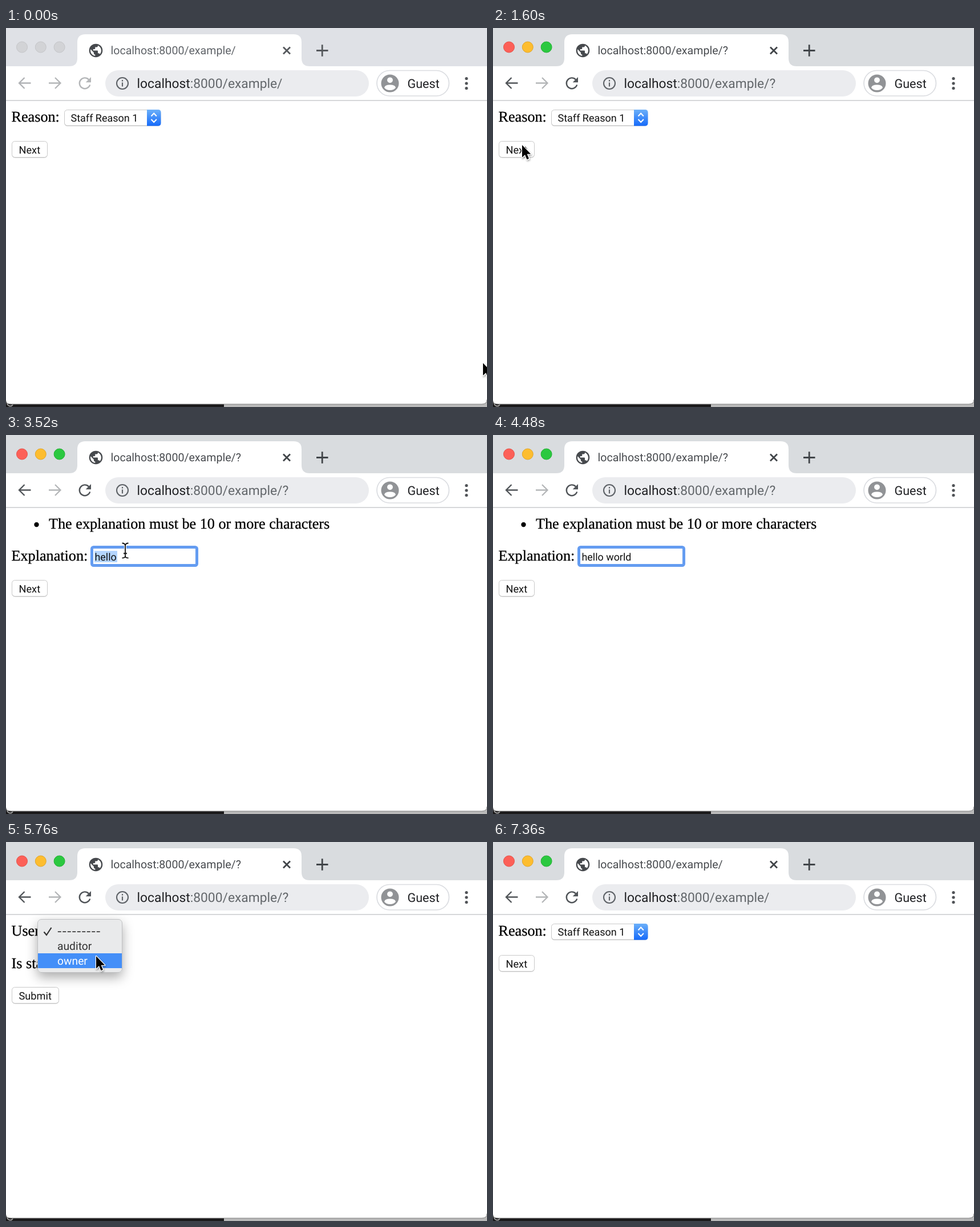
Recreate the animation shown at these times as an HTML page. Size 843x664 px, loop 7.52 s.

```html
<!DOCTYPE html>
<html lang="en">
<head>
<meta charset="utf-8">
<title>Form wizard</title>
<style>
  html, body { margin: 0; width: 100%; height: 100%; overflow: hidden; background: #fff; }
  svg { display: block; width: 843px; height: 664px; }
  text { white-space: pre; text-rendering: geometricPrecision; }
  .ui { font-family: Roboto, "Open Sans", sans-serif; }
  .serif { font: 26.2px "Liberation Serif", "Noto Serif", serif; stroke: #000; stroke-width: .3; }
  .line { fill: none; stroke-linecap: butt; }
</style>
</head>
<body>
<svg viewBox="0 0 843 664">
  <defs>
    <linearGradient id="blue" x1="0" y1="0" x2="0" y2="1">
      <stop offset="0" stop-color="#6cb0f9"/><stop offset="1" stop-color="#156afa"/>
    </linearGradient>
    <filter id="lift" x="-40%" y="-50%" width="180%" height="220%">
      <feDropShadow dx="0" dy="8" stdDeviation="10" flood-opacity=".33"/>
    </filter>
    <filter id="soft" x="-50%" y="-50%" width="220%" height="220%">
      <feDropShadow dx="1" dy="2" stdDeviation="1.6" flood-opacity=".35"/>
    </filter>
    <path id="bar" d="M-5.500 -13.500Q0 -13.500 0 -9V9Q0 12.500 -5.500 12.500M5.500 -13.500Q0 -13.500 0 -9V9Q0 12.500 5.500 12.500M-3 4.500H3"/>
  </defs>

  <!-- desktop strip and window body -->
  <rect y="640" width="382" height="24" fill="#1b1a1b"/>
  <rect x="382" y="640" width="461" height="24" fill="#b9b9b9"/>
  <path d="M2 657a5.5 5.5 0 0 0 10 3" class="line" stroke="#aaa" stroke-width="1.6"/>
  <path d="M0 0H843V651Q843 659 834 659H9Q0 659 0 653Z" fill="#fff"/>
  <path d="M843 651Q843 659 834 659H9Q0 659 0 653" class="line" stroke="#808080"/>

  <!-- tab strip -->
  <rect id="strip" width="843" height="67"/>
  <path d="M111 67Q125 67 125 53V25Q125 11 139 11H504Q518 11 518 25V53Q518 67 532 67Z" fill="#fff"/>
  <g id="lights"></g>
  <path transform="translate(143.3 25.3) scale(1.18)" fill="#46494d" d="M12 2a10 10 0 1 0 0 20a10 10 0 0 0 0 -20zm-1 17.930c-3.950-.490-7-3.850-7-7.930 0-.620.080-1.210.210-1.790L9 15v1c0 1.100.900 2 2 2zm6.900-2.540c-.260-.810-1-1.390-1.900-1.390h-1v-3c0-.550-.450-1-1-1H8v-2h2c.550 0 1-.450 1-1V7h2c1.100 0 2-.900 2-2v-.410c2.930 1.190 5 4.060 5 7.410 0 2.080-.800 3.970-2.100 5.390z"/>
  <text id="title" class="ui" x="183.500" y="46" font-size="19.6"></text>
  <path id="tabIcons" d="M486 33.500L498 45.500M498 33.500L486 45.500M544 39.500H564.500M554.200 29.300V49.700" class="line" stroke-width="2.800"/>

  <!-- toolbar -->
  <path d="M0 127H843" stroke="#d6d7d9" stroke-width="1.8"/>
  <path id="back" d="M43.500 96.500H23M32.500 87L23 96.500L32.500 106" class="line" stroke-width="2.3"/>
  <path d="M75 96.500H95.500M86 87L95.500 96.500L86 106" class="line" stroke="#b4b6b8" stroke-width="2.3"/>
  <g id="reload">
    <path d="M145 90.300A9.400 9.400 0 1 0 147.200 99.500" class="line" stroke="currentColor" stroke-width="2.4"/>
    <path d="M149 86V95.300H139.700Z" fill="currentColor"/>
  </g>
  <rect x="174" y="74" width="462" height="46" rx="23" fill="#ebecef"/>
  <g stroke="#5f6368" stroke-width="2.1" fill="none">
    <circle cx="204" cy="97" r="10"/>
    <path d="M204 95.500V102.500M204 91V93.500"/>
  </g>
  <text class="ui" x="229.500" y="104.800" font-size="22.8" fill="#202124">localhost<tspan id="url" fill="#63676b"></tspan></text>
  <rect x="650" y="74.500" width="126.500" height="44.500" rx="22.200" fill="#fff" stroke="#dadce0" stroke-width="1.700"/>
  <circle cx="673" cy="97" r="15.500" fill="#919396"/>
  <circle cx="673" cy="91.300" r="4.900" fill="#fff"/>
  <path d="M663 104.500Q664 99.500 673 99.500T683 104.500Q679.500 109 673 109T663 104.500Z" fill="#fff"/>
  <text class="ui" x="703.500" y="104.800" font-size="21.6" fill="#202124">Guest</text>
  <g fill="#505357">
    <circle cx="807" cy="88.500" r="2.600"/><circle cx="807" cy="97" r="2.600"/><circle cx="807" cy="105.500" r="2.600"/>
  </g>

  <g id="page"></g>
  <g id="arrow" filter="url(#soft)">
    <path d="M0 0V21.800L5 17L8.500 25.300L12 23.800L8.600 15.800H15.200Z" stroke="#fff" stroke-width="2.400" stroke-linejoin="round" paint-order="stroke"/>
  </g>
  <g id="beam" class="line">
    <use href="#bar" stroke="#fff" stroke-width="4"/>
    <use href="#bar" stroke="#111" stroke-width="1.800"/>
  </g>
</svg>
<script>
const STEP = 160, STEPS = 47;
const $ = id => document.getElementById(id);

// Pointer keys: step, x, y, shape (empty shape hides it)
const pointer = [
  [0, 836, 587, 'arrow'], [1, 836, 587, 'arrow'], [5, 224, 175, 'arrow'],
  [6, 205, 160, 'arrow'], [8, 51, 205, 'arrow'], [11, 51, 205, 'arrow'],
  [13, 205, 157, 'beam'], [14, 205, 157, ''], [20, 235, 212, 'beam'],
  [22, 209, 203, 'beam'], [23, 209, 203, ''], [31, 178, 160, 'arrow'],
  [32, 156, 139, 'arrow'], [34, 156, 152, 'arrow'], [36, 158, 200, 'arrow'],
  [37, 158, 200, 'arrow'], [38, 108, 209, 'arrow'], [39, 108, 209, 'arrow'],
  [40, 52, 264, 'arrow'], [41, 52, 264, 'arrow'], [44, 720, 610, 'arrow'],
  [45, 720, 610, '']
];

const text = (x, y, str, size = 18, fill = '#111') =>
  `<text class="ui" x="${x}" y="${y}" font-size="${size}" fill="${fill}">${str}</text>`;
const dashes = (x, y) =>
  `<text x="${x}" y="${y}" font-size="18.5" fill="#222" style="font-family:Inter,sans-serif">---------</text>`;
const label = (x, y, str) => `<text class="serif" x="${x}" y="${y}">${str}</text>`;

const box = (x, y, w, h, r = 5) =>
  `<rect x="${x}" y="${y + 1}" width="${w}" height="${h}" rx="${r}" fill="#bdbdbd"/>
   <rect x="${x}" y="${y}" width="${w}" height="${h}" rx="${r}" fill="#fff" stroke="#c9c9c9"/>`;

const button = (y, w, str) => box(10.5, y, w, 28) + text(22.5, y + 21.2, str, 18.2);

const select = (x, w, content) => {
  const r = x + w;
  return box(x, 143.5, w, 27.5) + content +
    `<path d="M${r - 24} 143H${r - 4.5}Q${r + .5} 143 ${r + .5} 148V166.500Q${r + .5} 171.500 ${r - 4.5} 171.500H${r - 24}Z" fill="url(#blue)"/>
     <path d="M${r - 16.5} 154.500l4.700 -5l4.700 5m-9.400 5.500l4.700 5l4.700 -5" class="line" stroke="#fff" stroke-width="2"/>`;
};

const reasonPage = () =>
  label(9.5, 164, 'Reason:') + select(102.5, 168.5, text(113.5, 164, 'Staff Reason 1')) + button(198.5, 62, 'Next');

function explainPage(n) {
  const failed = n >= 19, dy = failed ? 56 : 0;
  const typed = n < 23 ? 'hello'.slice(0, Math.max(0, n - 13))
                       : 'hello world'.slice(0, (n - 22) * 2);
  const focused = n >= 13 && n < 19 || n >= 21;
  const error = '<circle cx="53.500" cy="157" r="4.200"/>' +
    label(75, 164, 'The explanation must be 10 or more characters');
  const ring = focused
    ? `<rect x="150.500" y="${140.5 + dy}" width="184" height="32" rx="3" fill="#fff" stroke="#649cf1" stroke-width="5"/>`
    : `<rect x="152.500" y="${142.5 + dy}" width="180" height="28" fill="#fff" stroke="#a9a9a9" stroke-width="1.600"/>`;
  const mark = n === 22 ? `<rect x="155" y="${147 + dy}" width="40" height="20" fill="#b4d5fe"/>` : '';
  return (failed ? error : '') + label(9.5, 164 + dy, 'Explanation:') + ring + mark +
    text(155.5, 163.5 + dy, typed, 17.9) + button(198.5 + dy, 62, 'Next');
}

function menu(n) {
  const row = n - 34;
  const ink = i => i === row ? '#fff' : '#333';
  return `<rect x="55.500" y="135.500" width="148" height="93" rx="6.500" fill="#e9eaeb" stroke="#bfc0c2" filter="url(#lift)"/>
    <rect x="56" y="${143 + 26 * row}" width="147" height="26" fill="#448ff8"/>
    <path d="M66.500 157.500L71 163L79.500 150" class="line" stroke="${ink(0)}" stroke-width="2.200"/>` +
    dashes(89.5, 162.5) + text(90, 188.5, 'auditor', 19.3, ink(1)) + text(90, 214.8, 'owner', 19.3, ink(2));
}

function userPage(n) {
  const tick = '<rect x="100" y="205" width="20" height="20" rx="4" fill="url(#blue)"/>' +
    '<path d="M104.500 215.500L108.500 220L115.500 209.500" class="line" stroke="#fff" stroke-width="2.400"/>';
  return label(9.5, 164, 'User:') +
    select(75, 122.5, n < 37 ? dashes(86.5, 164) : text(86.5, 164, 'owner')) +
    label(9.5, 221, 'Is staff:') +
    (n < 39 ? box(100.5, 205.5, 19, 18.5, 4) : tick) + button(254.5, 82, 'Submit') +
    (n >= 34 && n < 37 ? menu(n) : '');
}

function drawChrome(n) {
  const active = n >= 2;
  const query = n >= 9 && n < 41 ? '?' : '';
  const path = ':8000/example/' + query;
  $('strip').setAttribute('fill', active ? '#d9dcdf' : '#dfe1e6');
  $('title').textContent = 'localhost' + path;
  $('title').setAttribute('fill', active ? '#484b4f' : '#5f6368');
  $('url').textContent = path;
  $('tabIcons').setAttribute('stroke', active ? '#414549' : '#56595d');
  $('back').setAttribute('stroke', active ? '#505458' : '#b0b2b5');
  $('reload').style.color = active ? '#505458' : '#b4b6b8';
  const fills = active ? ['#fc6058', '#fdbd2f', '#2bc840'] : Array(3).fill('#d2d3d6');
  const rims = active ? ['#e4524a', '#e0a52a', '#24b035'] : Array(3).fill('#c4c5c8');
  $('lights').innerHTML = fills.map((fill, i) =>
    `<circle cx="${28 + 32.8 * i}" cy="33.500" r="9.500" fill="${fill}" stroke="${rims[i]}"/>`).join('');
}

function drawPointer(n) {
  const i = pointer.findLastIndex(key => key[0] <= n);
  const a = pointer[i], b = pointer[i + 1] || a;
  const k = b === a || !a[3] ? 0 : (n - a[0]) / (b[0] - a[0]);
  const at = c => a[c] + (b[c] - a[c]) * k;
  for (const shape of ['arrow', 'beam']) {
    $(shape).style.display = a[3] === shape ? '' : 'none';
    $(shape).setAttribute('transform', `translate(${at(1)} ${at(2)})`);
  }
}

let shown = -1;
function tick() {
  const n = Math.floor(performance.now() / STEP) % STEPS;
  if (n !== shown) {
    shown = n;
    drawChrome(n);
    $('page').innerHTML = n >= 11 && n < 30 ? explainPage(n) : n >= 30 && n < 41 ? userPage(n) : reasonPage();
    drawPointer(n);
  }
  requestAnimationFrame(tick);
}
tick();
</script>
</body>
</html>
```
